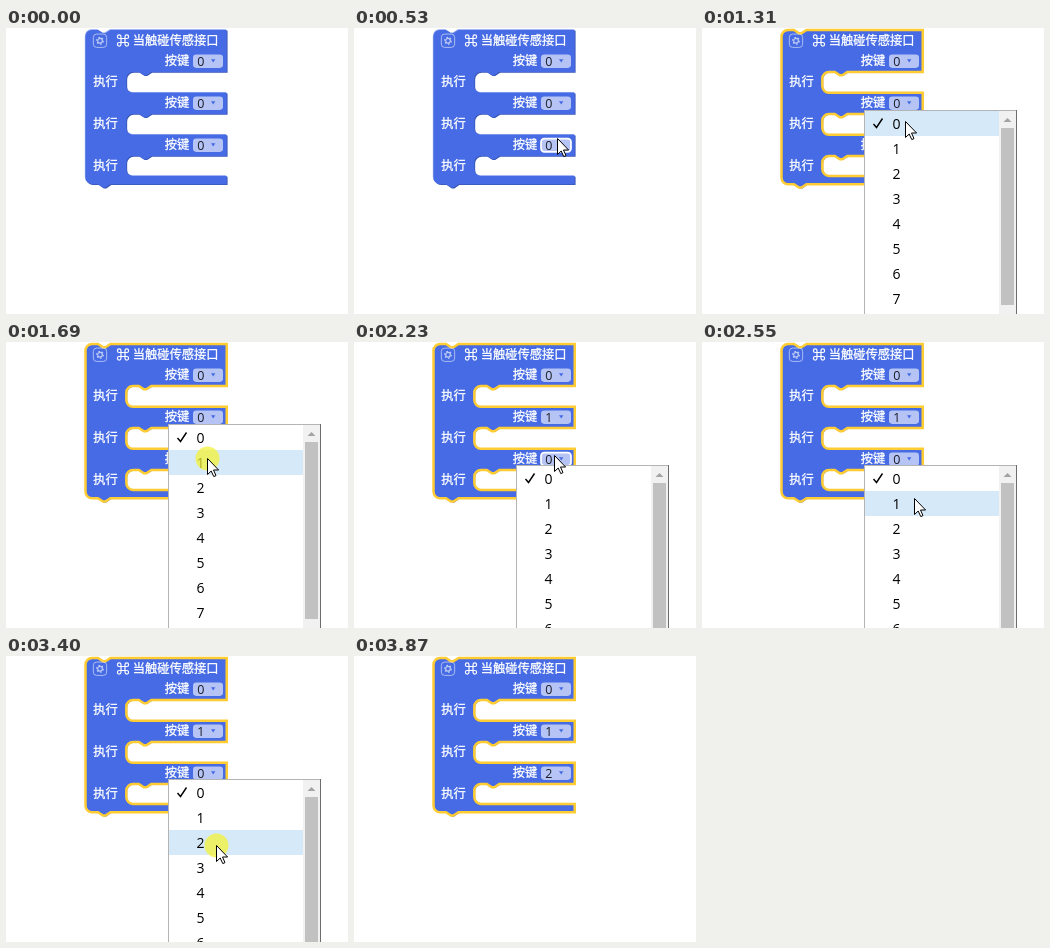
An HTML page for the animation above (4340 ms loop, 342 by 286 pixels).

```html
<!DOCTYPE html>
<html lang="zh">
<head>
<meta charset="utf-8">
<style>
  html, body { margin: 0; width: 100%; height: 100%; overflow: hidden; background: #fff; }
  svg { display: block; }
  text { font: 12.25px "Noto Sans CJK SC", "Noto Sans CJK", sans-serif; fill: #fff; stroke: #fff; stroke-width: .3; }
  text.digit { font: 12.5px "Open Sans", "Noto Sans", sans-serif; fill: #1c1c28; stroke: none; }
  text.item { font: 14px "Open Sans", "Noto Sans", sans-serif; fill: #000; stroke: none; }
</style>
</head>
<body>
<svg id="stage" width="342" height="286" viewBox="0 0 342 286">
  <g transform="translate(79.5 1.9) scale(.8333)">
    <path id="light" class="shape" fill="#8ba3f1" transform="translate(-.8 -.8)"/>
    <path class="shape" fill="#3855b6" transform="translate(1 1)"/>
    <path id="body" class="shape" fill="#466be4" stroke-width="3"/>
    <g transform="translate(9.4 5)" opacity=".65" fill="none" stroke="#fff">
      <rect width="16" height="16" rx="4"/>
      <circle cx="8" cy="8" r="2.8" stroke-width="1.4"/>
      <circle cx="8" cy="8" r="4" stroke-width="1.4" pathLength="12" stroke-dasharray="1"/>
    </g>
  </g>
  <path transform="translate(117 12.5)" fill="none" stroke="#fff" stroke-width="1.2"
    d="M-2-2H-3.8A1.8 1.8 0 1 1-2-3.8V3.8A1.8 1.8 0 1 1-3.8 2H3.8A1.8 1.8 0 1 1 2 3.8V-3.8A1.8 1.8 0 1 1 3.8-2Z"/>
  <text x="126.7" y="17.4">当触碰传感接口</text>
  <g id="rows"></g>
  <g id="menu">
    <rect x="162.5" y=".5" width="152" height="219" fill="#fff" stroke="#b4b4b4"/>
    <path d="M314.5 0V220" stroke="#6c6c6c"/>
    <rect id="hover" x="163" width="134" height="25" fill="#d6e9f8"/>
    <path d="M171.5 14L174.5 17.5L180.5 8.5" fill="none" stroke="#000" stroke-width="1.4"/>
    <g id="items"></g>
    <rect x="297" y="1" width="17" height="218" fill="#f1f1f1"/>
    <path d="M301.5 12L305.5 8L309.5 12Z" fill="#a3a3a3"/>
    <rect x="299" y="18" width="13" height="177" fill="#c1c1c1"/>
  </g>
  <g id="pointer">
    <circle id="click" cx="-.5" cy="-.5" r="12" fill="#f4f232" opacity=".72"/>
    <path d="M-.5-.5V15.5L3.2 12L5.8 17.6L8 16.6L5.5 11H10.6Z" fill="#fff" stroke="#000"/>
  </g>
</svg>
<script>
const LOOP = 4340;
const el = id => document.getElementById(id);
const show = (node, on) => node.setAttribute('display', on ? 'inline' : 'none');
const within = (t, a, b) => t >= a && t < b;

// Block outline: three rows, each followed by a statement slot; the last slot is a little lower
const slot = (row, side) =>
  `v${row}H79l-6 4h-3l-6-4h-7a8 8 0 0 0-8 8v${side}a8 8 0 0 0 8 8H169.5`;
const outline = 'M0 8a8 8 0 0 1 8-8h7l6 4h3l6-4H169.5' +
  slot(50.4, 9) + slot(25.4, 9) + slot(25.4, 8) +
  'v10H30l-6 4h-3l-6-4H8a8 8 0 0 1-8-8Z';
document.querySelectorAll('.shape').forEach(p => p.setAttribute('d', outline));

const rowY = [33, 75, 117];
el('rows').innerHTML = rowY.map(y => `
  <text x="158.7" y="${y + 4.4}">按键</text>
  <text x="87.3" y="${y + 25.4}">执行</text>
  <rect class="field" x="187" y="${y - 6.4}" width="30" height="13.3" rx="3.3"
    fill="#fff" fill-opacity=".6" stroke-width="1.7"/>
  <text class="digit value" x="191.2" y="${y + 4.6}">0</text>
  <path d="M205 ${y - 1.8}h4.4l-2.2 3.2Z" fill="#466be4"/>`).join('');
const fields = document.querySelectorAll('.field');
const values = document.querySelectorAll('.value');

el('items').innerHTML = [...Array(8).keys()].map(n =>
  `<text class="item" x="190.6" y="${19 + 25 * n}">${n}</text>`).join('');

// Pointer moves: first step, last step, number of steps, end point
const start = [308, 300];
const moves = [
  [150, 610, 7, 187, 79],
  [680, 680, 1, 205, 70],
  [1230, 1460, 4, 202, 117],
  [1850, 2000, 3, 201, 114],
  [2400, 2550, 3, 213, 157],
  [2630, 2860, 4, 210, 197],
  [2930, 2930, 1, 209, 198],
  [3100, 3170, 2, 211, 190],
  [3480, 3870, 6, 312, 290]
];
const clicks = [850, 1690, 2150, 3400];
const menus = [[930, 1770, 82], [2230, 3480, 123]];

function pointerAt(t) {
  let [x, y] = start;
  for (const [from, to, steps, endX, endY] of moves) {
    if (t < from) break;
    const gap = (to - from) / (steps - 1) || 1;
    const k = Math.min(1, (Math.floor((t - from) / gap + 0.1) + 1) / steps);
    x += (endX - x) * k;
    y += (endY - y) * k;
  }
  return [Math.round(x), Math.round(y)];
}

function draw(t) {
  const selected = t >= 850;
  el('body').setAttribute('stroke', selected ? '#fc3' : 'none');
  show(el('light'), !selected);
  values[1].textContent = t >= 1770 ? 1 : 0;
  values[2].textContent = t >= 3480 ? 2 : 0;

  const [x, y] = pointerAt(t);
  const menu = menus.find(([a, b]) => within(t, a, b));
  fields.forEach((field, i) => {
    const over = x > 188 && x < 217 && Math.abs(y - rowY[i]) < 6.5;
    field.setAttribute('stroke', over ? '#fff' : 'none');
  });

  show(el('menu'), menu);
  if (menu) {
    const top = menu[2];
    const item = Math.floor((y - top - 1) / 25);
    el('menu').setAttribute('transform', `translate(0 ${top})`);
    el('hover').setAttribute('y', 1 + 25 * item);
    show(el('hover'), item >= 0);
  }

  show(el('pointer'), within(t, 150, 3870));
  el('pointer').setAttribute('transform', `translate(${x} ${y})`);
  show(el('click'), clicks.some(c => within(t, c, c + 80)));
}

function frame() {
  draw(performance.now() % LOOP);
  requestAnimationFrame(frame);
}
frame();
</script>
</body>
</html>
```
